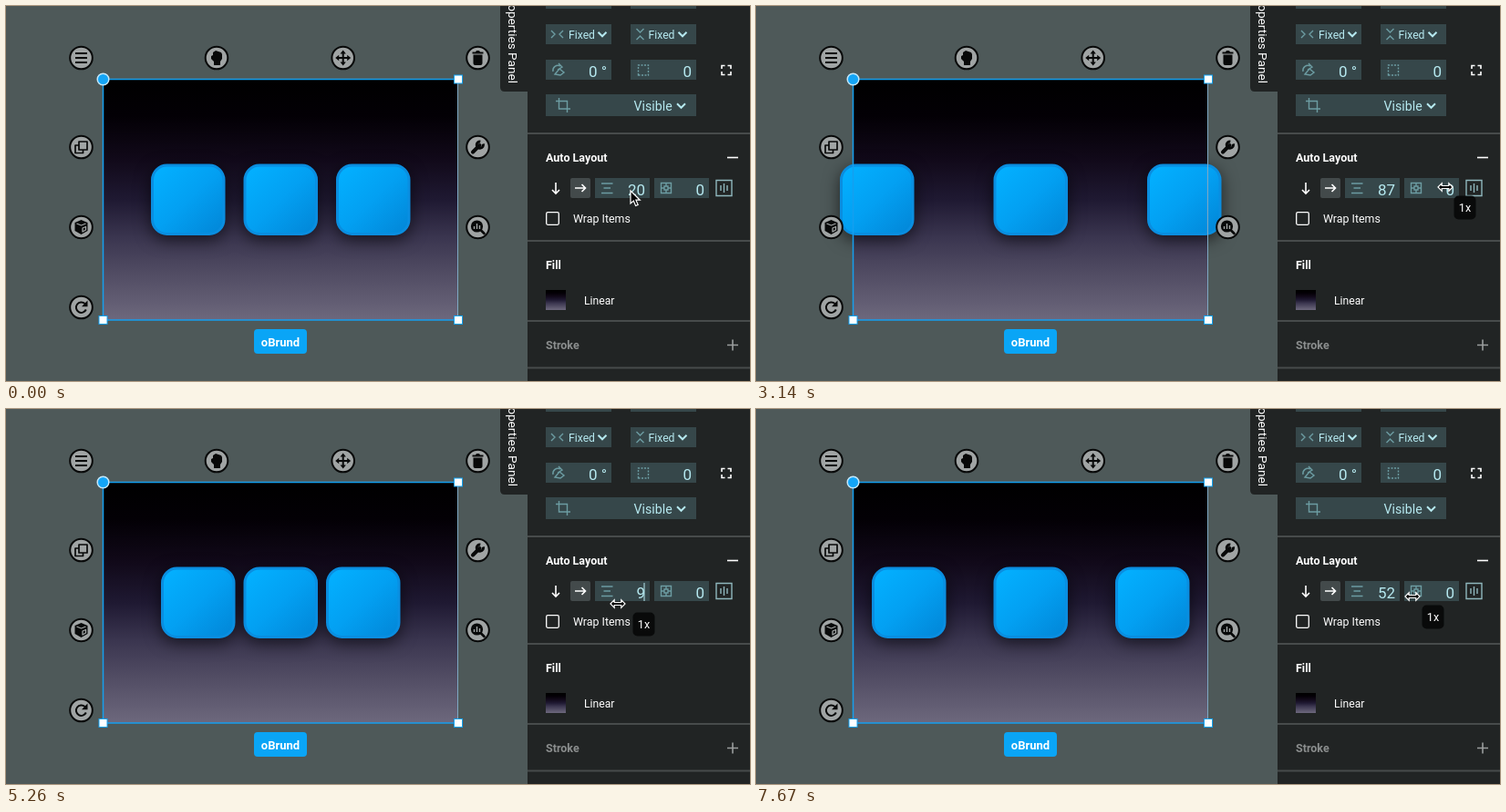
These frames come from a looping animation (816 by 412 pixels, 8 s). An HTML page:

```html
<!DOCTYPE html>
<html lang="en">
<head>
<meta charset="utf-8">
<title>Auto layout gap</title>
<style>
  html, body { margin: 0; width: 100%; height: 100%; overflow: hidden; background: #4e5959; }
  svg { display: block; }
  text { font: 12.2px Roboto, sans-serif; fill: #fff; }
  .bold { font-weight: 700; font-size: 12.5px; }
  .pale { fill: #b5e8ef; }
  .number { font-size: 17px; text-anchor: end; }
  .field rect { fill: #36474a; }
  .line { fill: none; stroke: #fff; stroke-width: 1.6; }
  .teal { fill: none; stroke: #6c9ca2; stroke-width: 1.4; }
  .chevron { fill: none; stroke: #b5e8ef; stroke-width: 2; }
  .icon { fill: none; stroke: #080909; stroke-width: 2; stroke-linejoin: round; }
  .solid { fill: #080909; stroke: none; }
  .shadow { filter: drop-shadow(0 5px 9px rgba(0, 0, 0, .6)); }
</style>
</head>
<body>
<svg width="816" height="412" viewBox="0 0 816 412">
  <defs>
    <linearGradient id="night" x2="0" y2="1">
      <stop offset="0"/>
      <stop offset=".15" stop-color="#030005"/>
      <stop offset=".33" stop-color="#110919"/>
      <stop offset=".5" stop-color="#1f1932"/>
      <stop offset=".66" stop-color="#3b3650"/>
      <stop offset=".82" stop-color="#534e65"/>
      <stop offset="1" stop-color="#6d687d"/>
    </linearGradient>
    <linearGradient id="blue" x2="1" y2="1">
      <stop offset=".05" stop-color="#03b0ff"/>
      <stop offset=".5" stop-color="#03a0f2"/>
      <stop offset=".95" stop-color="#0288d9"/>
    </linearGradient>
    <rect id="tile" x="1.5" y="175" width="78.5" height="75.5" rx="16" fill="url(#blue)" stroke="#0a8ee0" stroke-width="3"/>
    <circle id="disc" r="12.3" fill="#a0a4a4"/>
    <path id="down" class="chevron" d="M-4.5 -2.2L0 2.3L4.5 -2.2"/>
    <rect id="handle" x="-4.5" y="-4.5" width="9" height="9" fill="#fff" stroke="#14a2f2"/>
  </defs>

  <!-- Artboard -->
  <rect x="107" y="81" width="389" height="264" fill="url(#night)"/>
  <g class="shadow">
    <use id="left" href="#tile"/>
    <use href="#tile" x="260.5"/>
    <use id="right" href="#tile"/>
  </g>
  <path d="M496 80.5H106.5V345H496" fill="none" stroke="#159fee" stroke-width="1.5"/>
  <path d="M495.5 81V345" stroke="#7fa9c4"/>
  <use href="#handle" x="496" y="80.5"/>
  <use href="#handle" x="106.5" y="345"/>
  <use href="#handle" x="496" y="345"/>
  <circle cx="106.5" cy="80.5" r="6.3" fill="#14a5f7" stroke="#c4e8fc" stroke-width="1.5"/>
  <rect x="272" y="355" width="58" height="27" rx="4" fill="#0aa5f6"/>
  <text class="bold" x="301" y="374" text-anchor="middle" style="font-size:13px">oBrund</text>

  <!-- Round tools -->
  <g class="icon">
    <g transform="translate(82.5 57)"><use href="#disc"/><path d="M-6.5 -5H6.5M-6.5 0H6.5M-6.5 5H6.5"/></g>
    <g transform="translate(231 57)"><use href="#disc"/><path class="solid" d="M-4 -6L-1 -8L5 -6L6 -4V1L4 4V8H-3V4L-6 1V-2L-4 -3Z"/></g>
    <g transform="translate(369.7 57)"><use href="#disc"/><path d="M-6 0H6M0 -6V6"/><path class="solid" d="M0 -8.5L3.2 -4.5H-3.2ZM0 8.5L3.2 4.5H-3.2ZM-8.5 0L-4.5 -3.2V3.2ZM8.5 0L4.5 -3.2V3.2Z"/></g>
    <g transform="translate(517.5 57)"><use href="#disc"/><path class="solid" d="M-6 -6.5H-2.5L-1.5 -8H1.5L2.5 -6.5H6V-4.5H-6ZM-5 -3.5H5V6Q5 8 3 8H-3Q-5 8 -5 6Z"/></g>
    <g transform="translate(82.5 155)"><use href="#disc"/><path d="M-2.5 -6H6.5V3H-2.5ZM-3 -2H-6.5V6.5H2V3.5" stroke-width="1.7"/></g>
    <g transform="translate(517.5 155)"><use href="#disc"/><path d="M-5.5 5.5L2 -2" stroke-width="4" stroke-linecap="round"/><path d="M5.8 -3.5A3.6 3.6 0 1 1 2.8 -6" stroke-width="3"/></g>
    <g transform="translate(82.5 243)"><use href="#disc"/><path class="solid" d="M0 -8L7 -5V4L0 8L-7 4V-5Z"/><path d="M-5 -4L0 -2L5 -4M1.5 1V5L5 3V-.5Z" stroke="#a0a4a4" stroke-width="1.3"/></g>
    <g transform="translate(517.5 243)"><use href="#disc"/><circle class="solid" cx="-1" cy="-1" r="6.6"/><path d="M3 3L7 7" stroke-width="2.6" stroke-linecap="round"/><path d="M-4 2V-1M-1 2V-4M2 2V-2" stroke="#a0a4a4" stroke-width="1.4"/></g>
    <g transform="translate(82.5 331)"><use href="#disc"/><path d="M4 -4A5.7 5.7 0 1 0 5.3 2.5"/><path class="solid" d="M7 -7.5V-.8H.5Z"/></g>
  </g>

  <!-- Properties panel -->
  <path d="M542 0H816V412H572V94H547Q542 94 542 89Z" fill="#212424"/>
  <text transform="translate(551 85) rotate(90)" text-anchor="end" style="font-size:13.6px">Properties Panel</text>
  <path d="M572 140H816M572 258H816M572 346H816M572 397.5H816" stroke="#474b4b" stroke-width="2"/>
  <g class="field">
    <rect x="592" y="-20" width="72" height="23"/>
    <rect x="685" y="-20" width="72" height="23"/>
    <rect x="592" y="20" width="72" height="22"/>
    <rect x="685" y="20" width="72" height="22"/>
    <rect x="592" y="59" width="72" height="22"/>
    <rect x="685" y="59" width="72" height="22"/>
    <rect x="592" y="97" width="165" height="24"/>
    <rect x="646" y="189" width="60" height="22"/>
    <rect x="711" y="189" width="60" height="22"/>
    <rect x="619" y="189" width="22" height="22" rx="2" style="fill:#434a4b"/>
  </g>
  <text class="pale" x="617" y="35.5">Fixed</text>
  <text class="pale" x="704.5" y="35.5">Fixed</text>
  <text class="pale" x="688.5" y="114.5" style="font-size:14.2px">Visible</text>
  <use href="#down" x="654" y="31"/>
  <use href="#down" x="742" y="31"/>
  <use href="#down" x="740.5" y="109.5"/>
  <text class="pale number" x="659" y="78">0 °</text>
  <text class="pale number" x="752" y="78">0</text>
  <path class="teal" d="M598 27L602 31L598 35M611 27L607 31L611 35M691.5 25L695.5 29L699.5 25M691.5 37L695.5 33L699.5 37" stroke-width="1.6"/>
  <path class="teal" d="M600 72A5.5 5.5 0 0 1 608 66M606 63L610 67L605 70M602 75L607 69L612 73L608 76Z"/>
  <path class="teal" d="M693.5 76V65H704.5V76Z" stroke-dasharray="2 1.5"/>
  <path class="teal" d="M606.5 101V113H619M603 104.5H615.5V117"/>
  <path class="line" d="M785 69V65.5H788.5M791.5 65.5H795V69M795 72V75.5H791.5M788.5 75.5H785V72"/>

  <text class="bold" x="592" y="171">Auto Layout</text>
  <path class="line" d="M791 166.5H803" stroke-width="2"/>
  <path class="line" d="M603 194V205.5M599 202L603 206L607 202M624 200H635.5M631.5 196L635.5 200L631.5 204"/>
  <path class="teal" d="M653 195H665.5M655.5 200H663M653 205.5H665.5"/>
  <path class="teal" d="M718.5 194.5H729.5V205.5H718.5ZM722 198H726V202H722ZM724 195V198M724 202V205M719 200H722M726 200H729" stroke-width="1.1"/>
  <path class="teal" d="M779 191.5H796V208.5H779ZM784 197V203M787.5 195V205M791 197V203" style="stroke:#8fb7bd" stroke-width="1.2"/>
  <text id="gap" class="pale number" x="701" y="208"></text>
  <path id="caret" d="M700 191V211" stroke="#b5e8ef"/>
  <text class="pale number" x="766" y="208">0</text>
  <rect class="line" x="592.7" y="226.7" width="13.6" height="13.6" rx="1.5" style="stroke-width:1.3"/>
  <text x="622" y="238" style="font-size:12.4px">Wrap Items</text>

  <text class="bold" x="592" y="289">Fill</text>
  <rect x="592" y="312" width="22" height="22" fill="url(#night)"/>
  <text x="634" y="328">Linear</text>
  <text class="bold" x="592" y="377" style="fill:#8b8e8e">Stroke</text>
  <path d="M791 372.5H803M797 366.5V378.5" stroke="#9a9d9d" stroke-width="1.6"/>

  <!-- Pointer and speed hint -->
  <g id="hint">
    <rect x="-12" y="-13" width="24" height="26" rx="5" fill="#090a0a"/>
    <text y="4.5" text-anchor="middle" style="font-size:12.6px">1x</text>
  </g>
  <path id="arrow" d="M0 0V14L3.3 11L5.6 16.5L8.2 15.4L5.9 10.2H10.3Z" fill="#000" stroke="#fff" stroke-width="1.2"/>
  <path id="resize" d="M-8 0L-3.8 -4.3V-1.5H3.8V-4.3L8 0L3.8 4.3V1.5H-3.8V4.3Z" fill="#000" stroke="#fff" stroke-width="1.2"/>
</svg>
<script>
  const LOOP = 8000;
  // time, gap, pointer x, pointer y
  const keys = [
    [0, 20, 688, 209], [1310, 20, 688, 209], [2060, 46, 715, 205], [2170, 50, 719.5, 204],
    [2910, 78, 746, 200], [3140, 87, 756, 199], [3720, 109, 776, 195], [4080, 109, 776, 195],
    [4920, 27, 690, 212], [5260, 9, 671, 214], [5700, 0, 666, 215], [6300, 0, 666, 215],
    [6750, 31, 700, 209], [7100, 42, 711, 207], [7670, 52, 720, 206], [LOOP, 52, 720, 206]
  ];
  const el = id => document.getElementById(id);
  const [left, right, gapText, caret, hint, arrow, resize] =
    ['left', 'right', 'gap', 'caret', 'hint', 'arrow', 'resize'].map(el);
  const move = (node, x, y) => node.setAttribute('transform', `translate(${x} ${y})`);
  const show = (node, on) => node.style.display = on ? '' : 'none';

  const slope = (i, c) => keys[i + 1] && keys[i]
    ? (keys[i + 1][c] - keys[i][c]) / (keys[i + 1][0] - keys[i][0]) : 0;

  // Harmonic mean keeps the curve monotone and flat at the rests.
  function tangent(i, c) {
    const a = slope(i - 1, c), b = slope(i, c);
    return a * b > 0 ? 2 * a * b / (a + b) : 0;
  }

  function sample(t, c) {
    const i = keys.findIndex(k => k[0] > t) - 1;
    const a = keys[i], b = keys[i + 1], span = b[0] - a[0], u = (t - a[0]) / span;
    const ease = u * u * (3 - 2 * u);
    return a[c] + (b[c] - a[c]) * ease
      + span * u * (1 - u) * ((1 - u) * tangent(i, c) - u * tangent(i + 1, c));
  }

  function draw(t) {
    const gap = Math.round(sample(t, 1)), x = sample(t, 2), y = sample(t, 3);
    gapText.textContent = gap;
    move(left, 179 - gap, 0);
    move(right, 342 + gap, 0);
    move(resize, x, y);
    move(hint, Math.min(690.5 + gap, 797), y + 22.5);
    move(arrow, 685, t < 120 ? 203 : 198);
    show(arrow, t < 180);
    show(resize, t >= 180);
    show(hint, t >= 950);
    show(caret, t >= 5000 && (t - 5000) % 1060 < 530);
  }

  const start = performance.now();
  function tick() {
    draw((performance.now() - start) % LOOP);
    requestAnimationFrame(tick);
  }
  tick();
</script>
</body>
</html>
```
